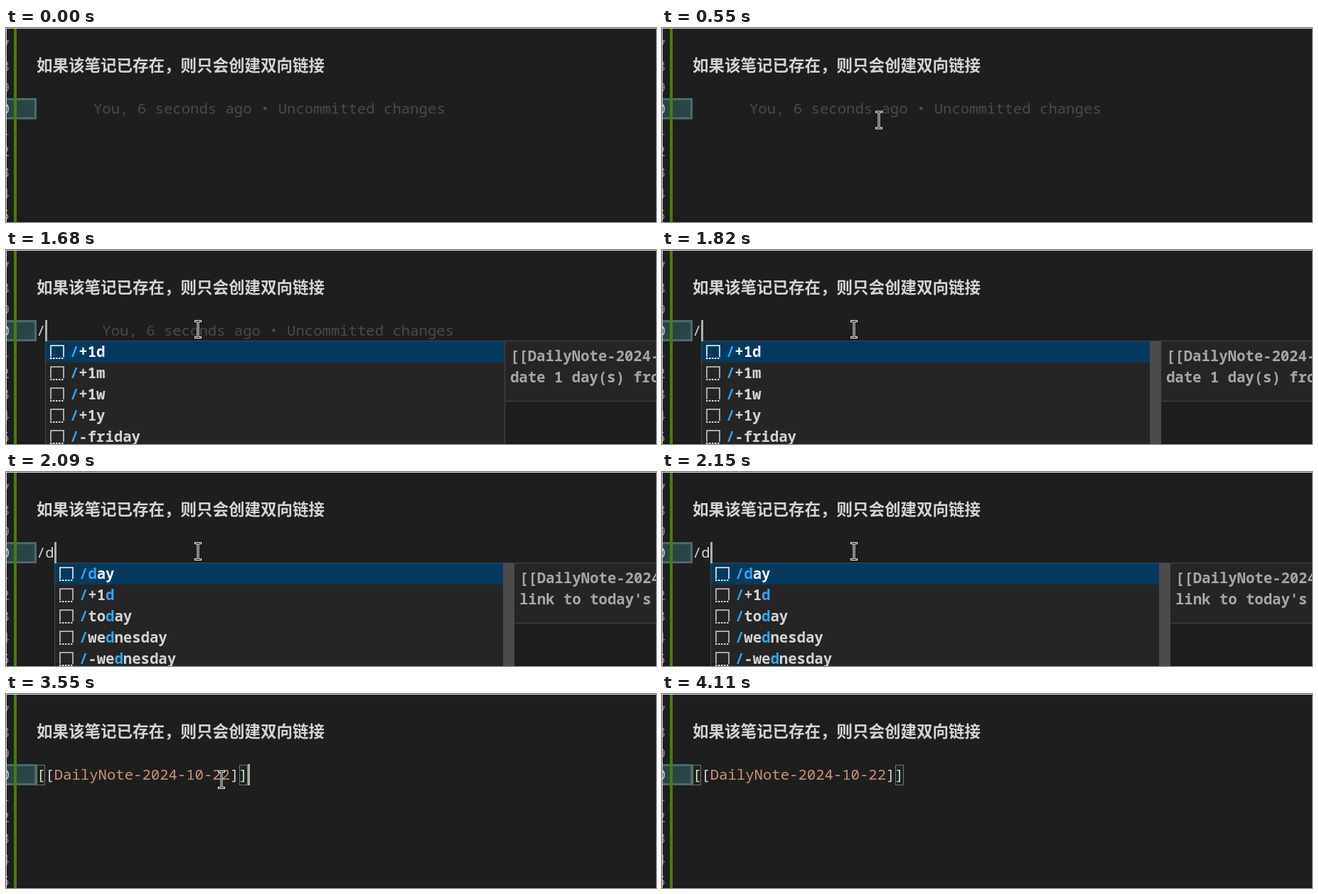
Recreate the animation shown at these times as an HTML page with a canvas. Size 914 by 274 pixels, loop 4.31 s.

```html
<!DOCTYPE html>
<html lang="zh-CN">
<head>
<meta charset="utf-8">
<style>
  html, body { margin: 0; width: 100%; height: 100%; overflow: hidden; background: #1e1e1e; }
  canvas { display: block; }
</style>
</head>
<body>
<canvas id="stage" width="914" height="274"></canvas>
<script>
const ctx = document.getElementById('stage').getContext('2d');
const LOOP = 4310, TICK = 69;
const LEFT = 43, CHAR = 12.37, ROW = 30, LINE_TOP = 99;
const MONO = '20.62px "Noto Sans Mono", "DejaVu Sans Mono", monospace';
const HEADING = 'bold 22.5px "Noto Sans CJK SC", "Noto Sans CJK", sans-serif';
const LINK = 'DailyNote-2024-10-22';

const MENUS = {
  '/': {
    items: ['/+1d', '/+1m', '/+1w', '/+1y', '/-friday'],
    detail: ['[[DailyNote-2024-10-23]]', 'date 1 day(s) from today']
  },
  '/d': {
    items: ['/day', '/+1d', '/today', '/wednesday', '/-wednesday'],
    detail: ['[[DailyNote-2024-10-22]]', "link to today's note"]
  }
};

const within = (t, from, to) => t >= from && t < to;
const clamp = v => Math.max(0, Math.min(1, v));
const mix = (a, b, k) => a + (b - a) * k;

function rect(x, y, w, h, color) {
  ctx.fillStyle = color;
  ctx.fillRect(x, y, w, h);
}

function frame(x, y, w, h, line, color) {
  ctx.strokeStyle = color;
  ctx.lineWidth = line;
  ctx.strokeRect(x + line / 2, y + line / 2, w - line, h - line);
}

function text(str, x, y, color, weight = 400, font = `${weight} ${MONO}`) {
  ctx.font = font;
  ctx.fillStyle = color;
  ctx.fillText(str, x, y);
}

function drawEditor() {
  rect(0, 0, 914, 274, '#1e1e1e');
  rect(0, 271, 914, 3, '#191919');
  rect(0, LINE_TOP, LEFT, ROW, '#29454a');
  frame(-3, LINE_TOP, LEFT + 3, ROW, 3, '#4d6a69');
  ctx.textAlign = 'right';
  [...'789012345'].forEach((digit, i) =>
    text(digit, 5, 31 + i * ROW, digit === '0' ? '#c6c6c6' : '#858585'));
  ctx.textAlign = 'left';
  rect(11, 0, 4, 274, '#487e02');
  rect(0, 0, 914, 1, '#d8d8d8');
  rect(0, 0, 1, 274, '#d8d8d8');
  text('如果该笔记已存在，则只会创建双向链接', LEFT, 61, '#d4d4d4', 700, HEADING);
}

function drawIcon(x, y, color) {
  ctx.strokeStyle = color;
  ctx.lineWidth = 1.5;
  ctx.beginPath();
  ctx.moveTo(x, y + 16);
  ctx.lineTo(x, y);
  ctx.lineTo(x + 18, y);
  ctx.lineTo(x + 18, y + 16);
  ctx.stroke();
  for (let dx = -1; dx < 19; dx += 4) rect(x + dx, y + 17, 2.5, 2, color);
}

function drawItem(item, typed, x, top, selected) {
  const color = selected ? '#ffffff' : '#d4d4d4';
  drawIcon(x + 8, top + 6, color);
  const matches = [...typed].map(c => item.indexOf(c));
  [...item].forEach((c, i) =>
    text(c, x + 35 + i * CHAR, top + 22, matches.includes(i) ? '#2aaaff' : color, 600));
}

function drawMenu(typed, barAlpha) {
  const { items, detail } = MENUS[typed];
  const x = Math.round(LEFT + typed.length * CHAR);
  rect(x, 128, 647, 160, '#252526');
  rect(x + 1, 129, 645, ROW, '#04395e');
  items.forEach((item, i) => drawItem(item, typed, x, 129 + i * ROW, i === 0));
  ctx.globalAlpha = barAlpha;
  rect(x + 631, 129, 15, 145, '#4b4b4c');
  ctx.globalAlpha = 1;
  frame(x, 128, 647, 160, 1, '#454545');
  rect(x + 646, 128, 300, 86, '#252526');
  frame(x + 646, 128, 300, 86, 1, '#454545');
  detail.forEach((line, i) => text(line, x + 654, 157 + i * ROW, '#a6a6a6', 600));
}

function drawLink() {
  const end = LEFT + 22 * CHAR;
  for (const x of [LEFT, end + CHAR]) {
    rect(Math.round(x), 100, 12, 29, '#1b251b');
    frame(Math.round(x), 100, 12, 29, 1, '#777777');
  }
  text('[[', LEFT, 121, '#d4d4d4', 500);
  text(LINK, LEFT + 2 * CHAR, 121, '#ce9178', 500);
  text(']]', end, 121, '#d4d4d4', 500);
}

// The pointer moves in discrete ticks, as in a screen recording.
function pointerAt(t) {
  if (t < 70 || t >= 4040) return null;
  if (t < 620) {
    const k = clamp(Math.floor((t - 69) / TICK) / 7);
    const eased = 1 - (1 - k) ** 2;
    return [mix(637, 298, eased), mix(221, 128, eased)];
  }
  if (t < 690) return [280, 106];
  if (t < 3550) return [270, 112];
  const k = clamp(Math.floor((t - 3549) / TICK + 1) / 7);
  const eased = k * k * (3 - 2 * k);
  return [mix(270, 860, eased), mix(112, 268, eased)];
}

function drawPointer([cx, cy]) {
  const x = Math.round(cx), y = Math.round(cy);
  ctx.beginPath();
  for (const side of [-1, 1]) {
    ctx.moveTo(x - 3.5, y + side * 11.5);
    ctx.lineTo(x + 3.5, y + side * 11.5);
  }
  ctx.moveTo(x, y - 11.5);
  ctx.lineTo(x, y + 11.5);
  ctx.lineCap = 'square';
  for (const [width, color] of [[3, '#ffffff'], [1, '#000000']]) {
    ctx.lineWidth = width;
    ctx.strokeStyle = color;
    ctx.stroke();
  }
  ctx.lineCap = 'butt';
}

function draw(t) {
  const typed = t < 1680 ? '' : t < 2090 ? '/' : t < 2610 ? '/d' : `[[${LINK}]]`;
  drawEditor();
  if (t < 1750)
    text('You, 6 seconds ago • Uncommitted changes', 123 + typed.length * CHAR, 121, '#4a4a4a');

  if (t >= 2610) drawLink();
  else text(typed, LEFT, 121, '#d4d4d4', 500);

  if (MENUS[typed]) drawMenu(typed, t < 1750 ? 0 : t < 1820 ? 0.6 : 1);

  const caretOn = within(t, 760, 1220) || within(t, 1680, 3090) || within(t, 3550, 4110);
  if (caretOn) rect(Math.round(LEFT + typed.length * CHAR), LINE_TOP, 3, ROW, '#aeafad');

  const pointer = pointerAt(t);
  if (pointer) drawPointer(pointer);
}

const start = performance.now();
function tick() {
  draw((performance.now() - start) % LOOP);
  requestAnimationFrame(tick);
}
tick();
</script>
</body>
</html>
```
